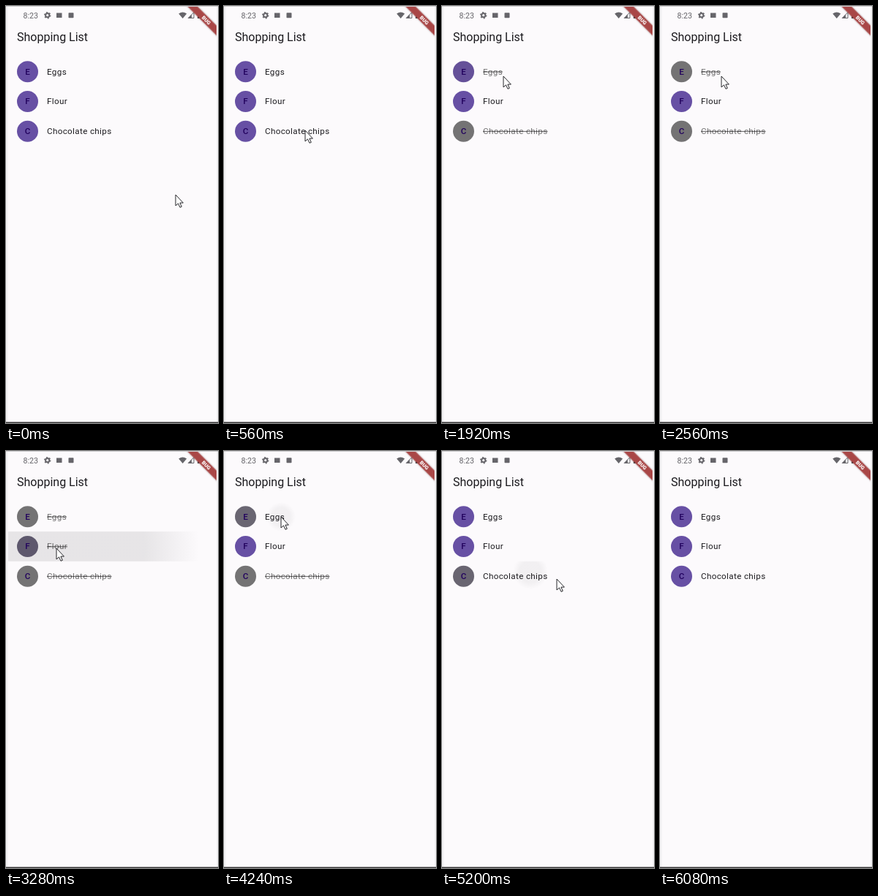
Recreate the animation shown at these times as an HTML page. Size 290 by 570 pixels, loop 6.96 s.

```html
<!DOCTYPE html>
<html lang="en">
<head>
<meta charset="utf-8">
<title>Shopping List</title>
<style>
  html, body { margin: 0; width: 100%; height: 100%; overflow: hidden; background: #fcfafc; }
  svg { display: block; width: 290px; height: 570px; font-family: Roboto, sans-serif; }
  .title { font-size: 16px; fill: #1c1b1f; }
  .item { font-size: 11.64px; letter-spacing: .36px; fill: #1c1b1f; }
  .item.done { fill: rgba(0, 0, 0, .54); text-decoration: line-through; }
  .letter { font-size: 11.64px; font-weight: 500; fill: #21005d; text-anchor: middle; }
  .clock { font-size: 10.6px; fill: #66656a; }
  .banner { font-size: 7px; font-weight: 900; fill: #fff; text-anchor: middle; }
</style>
</head>
<body>
<svg viewBox="0 0 290 570">
  <defs>
    <radialGradient id="ink" gradientUnits="userSpaceOnUse">
      <stop offset=".62" stop-color="#1c1b1f" stop-opacity=".095"/>
      <stop offset="1" stop-color="#1c1b1f" stop-opacity="0"/>
    </radialGradient>
    <clipPath id="screen"><rect x="3" y="1" width="285" height="567"/></clipPath>
    <filter id="shade" x="-20%" y="-60%" width="140%" height="220%">
      <feDropShadow dx="0" dy="0" stdDeviation="1.2" flood-opacity=".45"/>
    </filter>
  </defs>

  <rect width="290" height="570" fill="#f4f3f5"/>
  <rect x="3" width="285" height="570" fill="#fcfafc"/>
  <rect width="290" height="1" fill="#cfced0"/>
  <rect y="568.6" width="290" height="1.4" fill="#333"/>

  <text class="clock" x="23.5" y="16.6">8:23</text>
  <g fill="#66656a">
    <circle cx="56.7" cy="12.7" r="2.6" fill="none" stroke="#66656a" stroke-width="2"/>
    <circle cx="56.7" cy="12.7" r="4" fill="none" stroke="#66656a" stroke-width="1.5" stroke-dasharray="1.8 2.39"/>
    <rect x="69" y="9.5" width="7.5" height="6.5"/>
    <rect x="85.5" y="9.3" width="7" height="7" rx=".8"/>
    <path d="M236.2 10.5Q241.7 6.3 247.2 10.5L241.7 17Z"/>
    <path d="M257 8.6V16.5H249.2Z" fill="none" stroke="#66656a"/>
    <path d="M254 11.6V16.5H249.2Z"/>
    <path d="M262 9.2H263.6V8H266.4V9.2H268V17H262Z" fill="#47464a"/>
  </g>

  <g clip-path="url(#screen)">
    <g transform="translate(274 19.5) rotate(45)">
      <rect x="-45" y="-4.7" width="90" height="9.4" fill="#a94747" filter="url(#shade)"/>
      <text class="banner" y="2.5">BUG</text>
    </g>
  </g>

  <text class="title" x="15" y="48">Shopping List</text>
  <rect id="ripple" x="3" width="285" height="40.7" fill="url(#ink)"/>
  <g id="list"></g>
  <path id="cursor" d="M0 0V15L3.5 11.9L6 17.3L8.3 16.3L5.9 11.1H10.4Z"
        fill="#fff" stroke="#26262a" stroke-width="1" stroke-linejoin="round"/>
</svg>
<script>
  const LOOP = 6960, TICK = 80, FADE = 200;
  const TOP = 69.4, ROW = 40.7;
  const $ = id => document.getElementById(id);
  const clamp = v => Math.min(1, Math.max(0, v));
  const mix = (a, b, k) => a + (b - a) * k;

  const add = (tag, attrs, text = '') => {
    const el = document.createElementNS('http://www.w3.org/2000/svg', tag);
    for (const k in attrs) el.setAttribute(k, attrs[k]);
    el.textContent = text;
    return $('list').appendChild(el);
  };

  const rows = ['Eggs', 'Flour', 'Chocolate chips'].map((name, i) => {
    const y = TOP + ROW * (i + .5);
    const avatar = add('circle', { cx: 29.5, cy: y, r: 14.5 });
    add('text', { class: 'letter', x: 29.5, y: y + 4 }, name[0]);
    return { avatar, label: add('text', { class: 'item', x: 56, y: y + 4 }, name) };
  });

  const taps = [
    { t: 900, row: 2, x: 111, y: 170 },
    { t: 1900, row: 0, x: 84, y: 96 },
    { t: 3150, row: 1, x: 69, y: 133 },
    { t: 3718, row: 1, x: 69, y: 133 },
    { t: 4198, row: 0, x: 78, y: 90 },
    { t: 5156, row: 2, x: 121, y: 165 }
  ];

  // Pointer stops: time, x, y
  const path = [
    [0, 232, 258], [560, 111, 170], [1440, 111, 170], [1880, 84, 96],
    [2600, 84, 96], [2990, 69, 133], [3800, 69, 133], [4160, 78, 90],
    [4480, 78, 90], [5120, 121, 165], [5200, 157, 175], [5280, 215, 180], [5360, 292, 181]
  ];

  function pointer(t) {
    const i = path.findIndex(p => p[0] > t);
    if (i < 0) return [300, 181];
    const [a, b] = [path[i - 1], path[i]];
    let k = (t - a[0]) / (b[0] - a[0]);
    if (b[0] <= 5120) k = k * k * (3 - 2 * k);
    return [mix(a[1], b[1], k), mix(a[2], b[2], k)];
  }

  function drawRow(row, i, t) {
    const past = taps.filter(p => p.row === i && p.t <= t);
    const done = past.length % 2 === 1;
    const k = past.length ? clamp((t - past.at(-1).t) / FADE) : 1;
    const grey = done ? k : 1 - k;
    const rgb = [103, 80, 164].map(c => Math.round(mix(c, 0, grey)));
    row.avatar.setAttribute('fill', `rgba(${rgb},${mix(1, .54, grey)})`);
    row.label.classList.toggle('done', done);
  }

  function drawRipple(t) {
    const tap = taps.findLast(p => p.t <= t);
    const age = tap ? t - tap.t : Infinity;
    const alpha = Math.min(clamp(age / 90), clamp((430 - age) / 200));
    $('ripple').setAttribute('opacity', alpha);
    if (!alpha) return;
    $('ripple').setAttribute('y', TOP + ROW * tap.row);
    const ink = $('ink');
    ink.setAttribute('cx', tap.x);
    ink.setAttribute('cy', tap.y);
    ink.setAttribute('r', Math.max(.1, 2 * (age - 32)));
  }

  function draw() {
    const t = Math.floor(performance.now() % LOOP / TICK) * TICK;
    rows.forEach((row, i) => drawRow(row, i, t));
    drawRipple(t);
    $('cursor').setAttribute('transform', `translate(${pointer(t)})`);
    requestAnimationFrame(draw);
  }
  draw();
</script>
</body>
</html>
```
